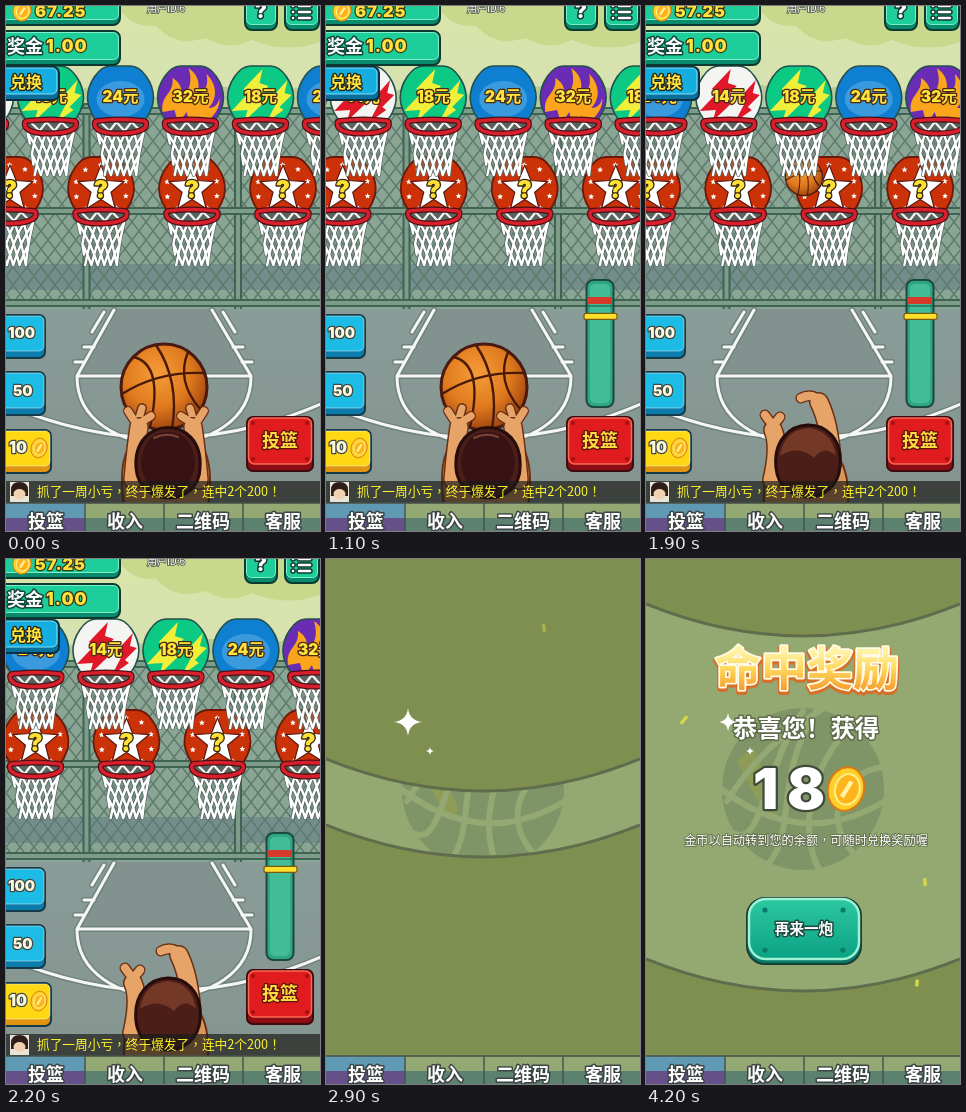
Recreate the animation shown at these times as an HTML page. Size 314 px wide and 525 px high, loop 4300 ms.

```html
<!DOCTYPE html>
<html lang="zh-CN">
<head>
<meta charset="utf-8">
<title>投篮</title>
<style>
html, body { margin: 0; width: 100%; height: 100%; overflow: hidden; background: #7f8f50; }
svg { display: block; width: 314px; height: 525px; }
text { font-family: "Noto Sans CJK SC", "Noto Sans CJK", "Noto Sans", sans-serif; }
.num { font-family: Inter, "Noto Sans CJK SC", "Noto Sans CJK", sans-serif; }
.plain { font-family: "Noto Sans CJK TC", "Noto Sans CJK", sans-serif; }
.b { font-weight: 900; paint-order: stroke; stroke-linejoin: round; }
.m { text-anchor: middle; }
.s { letter-spacing: 1px; }
</style>
</head>
<body>
<svg id="stage" viewBox="0 0 314 525"></svg>
<script>
const LOOP = 4300, STEP = 100;
const stage = document.getElementById('stage');
const clamp = v => Math.max(0, Math.min(1, v));
const mix = (a, b, k) => a + (b - a) * k;
const ramp = (t, a, b) => clamp((t - a) / (b - a));

// value at t from [time, value] pairs
function keys(t, list) {
  let [pt, pv] = list[0];
  for (const [kt, kv] of list) {
    if (t <= kt) return kt === pt ? kv : mix(pv, kv, ramp(t, pt, kt));
    [pt, pv] = [kt, kv];
  }
  return pv;
}

const box = (x, y, w, h, r, fill, edge = '#12382f', sw = 2) =>
  `<rect x="${x}" y="${y}" width="${w}" height="${h}" rx="${r}" fill="${fill}" stroke="${edge}" stroke-width="${sw}"/>`;
const label = (s, x, y, size, fill, edge, sw, cls = '') =>
  `<text class="b ${cls}" x="${x}" y="${y}" font-size="${size}" fill="${fill}" stroke="${edge}" stroke-width="${sw}">${s}</text>`;
const line = (d, color, w) =>
  `<path d="${d}" fill="none" stroke="${color}" stroke-width="${w}" stroke-linecap="round" stroke-linejoin="round"/>`;
const outlined = (d, color, w, edge) => line(d, edge, w + 3) + line(d, color, w);
const dots = (list, r, fill) => list.map(([x, y]) => `<circle cx="${x}" cy="${y}" r="${r}" fill="${fill}"/>`).join('');
const corners = (x, y) => [[-x, -y], [x, -y], [-x, y], [x, y]];

const coin = (x, y, rx, ry) => `<g transform="translate(${x} ${y}) rotate(14)">
  <ellipse rx="${rx}" ry="${ry}" fill="#ffd02c" stroke="#d97a12" stroke-width="${rx / 9}"/>
  <ellipse cx="${rx * .08}" rx="${rx * .68}" ry="${ry * .7}" fill="#ffb41c" stroke="#fff08a" stroke-width="${rx / 9}"/>
  <path d="M${rx * .2} ${-ry * .4}L${-rx * .12} ${ry * .4}" stroke="#fff3a0" stroke-width="${rx / 4}"/></g>`;

function netPath() {
  const at = (i, j) => {
    const w = 23 - 2.6 * j + .2 * j * j;
    return `${(-w + 2 * w * Math.max(0, Math.min(5, i)) / 5).toFixed(1)} ${(6 + j * 10.5).toFixed(1)}`;
  };
  let d = '';
  for (let j = 0; j < 4; j++)
    for (let i = 0; i <= 5; i++) {
      const c = i + (j % 2) / 2;
      d += `M${at(c, j)}L${at(c - .5, j + 1)}M${at(c, j)}L${at(c + .5, j + 1)}`;
    }
  return d;
}

function starPath(n, R, r, x = 0, y = 0) {
  let d = '';
  for (let i = 0; i < n * 2; i++) {
    const a = Math.PI * (i / n - .5), q = i % 2 ? r : R;
    d += `${i ? 'L' : 'M'}${(x + q * Math.cos(a)).toFixed(2)} ${(y + q * Math.sin(a)).toFixed(2)}`;
  }
  return d + 'Z';
}

const drop = 'M-33 0C-33 -14 -22 -32 -10 -32H10C22 -32 33 -14 33 0C33 14 22 24 18 32H-18C-22 24 -33 14 -33 0Z';
const bolt = 'M-29 13L-12 -5L-17 -9L2 -29L-1 -15L8 -12L-6 2L3 5L-16 23L-13 12ZM6 24L15 7L9 2L27 -18L24 -5L31 -3L19 9L23 12Z';
const flame = 'M-28 14C-30 -4 -16 -4 -18 -20C-8 -14 -8 -6 -10 0C0 -6 2 -18 -2 -30C12 -20 8 -8 6 -2C16 -6 18 -14 16 -24C28 -12 26 2 18 10C26 10 28 4 29 0C30 14 18 22 12 28L8 18L0 27L-4 14L-12 26L-16 12Z';
const art = {
  14: ['#f4f4f2', `<path d="${bolt}" fill="#e01828"/>`],
  18: ['#0cc983', `<path d="${bolt}" fill="#f0f03a"/>`],
  24: ['#0f7fd2', '<ellipse cy="1" rx="24" ry="18" fill="#3a9ade"/>'],
  32: ['#6a2cb4', `<path d="${flame}" fill="#fba51c"/>`]
};
const prizes = [24, 14, 18, 24, 32, 18, 24];

const prizeBoard = n => `<path d="${drop}" fill="${art[n][0]}" stroke="#23504c" stroke-width="1.6"/>${art[n][1]}` +
  label(n + '元', 0, 4, 15.5, '#ffe43c', '#4a2a10', 2.6, 'num m');
function mysteryBoard() {
  let stars = '';
  for (let i = 0; i < 10; i++) {
    const a = i * Math.PI / 5 + .3;
    stars += starPath(5, 3, 1.4, 26 * Math.cos(a), 24 * Math.sin(a));
  }
  return `<path d="${drop}" fill="#cc3208" stroke="#6a1a0c" stroke-width="1.8"/><path d="${stars}" fill="#fff"/>
    <path d="${starPath(5, 24, 10.5)}" fill="#fff" stroke="#5c1a10" stroke-width="1.2"/>` +
    label('?', 0, 9, 24, '#ffe034', '#33240c', 2.6, 'num m');
}
const row = (n, y, make, cls) => Array.from({ length: n }, (_, i) =>
  `<g class="${cls}" data-y="${y}">${make(i)}</g>`).join('');
const hoop = () => '<use href="#hoop"/>';

const rimPath = 'M-24 -6Q0 -9 24 -6Q27 -5 25 0Q20 6 0 6.500T-25 0Q-27 -5 -24 -6Z';
const defs = `<defs>
  <pattern id="mesh" width="14" height="18" patternUnits="userSpaceOnUse">
    <path d="M0 0L7 9L0 18M14 0L7 9L14 18" fill="none" stroke="#5d7a6c" stroke-width="1.5"/></pattern>
  <radialGradient id="leather" cx=".42" cy=".35" r=".7">
    <stop offset="0" stop-color="#f59c3a"/><stop offset=".55" stop-color="#e07a1e"/><stop offset="1" stop-color="#963c0c"/></radialGradient>
  <linearGradient id="sky" x2="0" y2="1"><stop offset="0" stop-color="#d9e5a8"/><stop offset="1" stop-color="#d5e0b6"/></linearGradient>
  <linearGradient id="floor" x2="0" y2="1"><stop offset="0" stop-color="#8a9c98"/><stop offset="1" stop-color="#84948f"/></linearGradient>
  <linearGradient id="gold" x2="0" y2="1">
    <stop offset=".3" stop-color="#fff3a6"/><stop offset=".55" stop-color="#ffd95c"/><stop offset=".9" stop-color="#f59a2c"/></linearGradient>
  <linearGradient id="mint" x2="0" y2="1"><stop offset="0" stop-color="#2cc9a0"/><stop offset="1" stop-color="#0ba184"/></linearGradient>
  <g id="hoop"><path d="M-23 5H23L17 47H-17Z" fill="#6c8078" opacity=".45"/>
    ${line(netPath(), '#4a5a54', 3.6)}${line(netPath(), '#fff', 2.4)}
    <path d="${rimPath}" fill="#57635e"/>${line('M-19 -4L-11 4L-4 -5L4 4L11 -5L19 3', '#f4f4f0', 2.2)}
    ${line(rimPath, '#4c1014', 6)}${line(rimPath, '#d81f2c', 3.6)}</g>
  <g id="ball"><circle r="43" fill="url(#leather)" stroke="#4a1a10" stroke-width="3"/>
    ${line('M-42 7Q-6 -16 40 -14M-8 -42Q16 -6 8 42M-30 -30Q0 -22 -14 40M24 -35Q12 -6 36 22', '#4a1a08', 2.4)}</g>
  <clipPath id="slot"><path id="slotPath"/></clipPath>
</defs>`;

const pole = (x, y, w, h) => box(x, y, w, h, 1, '#7d9c8a', '#3f6552', 2);
const scenery = `
  <rect width="314" height="130" fill="url(#sky)"/>
  <path d="M112 0Q124 22 150 20Q170 42 200 32Q222 46 246 34Q280 48 314 36V0Z" fill="#c8d98e"/>
  <path d="M0 108V92Q26 72 56 90Q110 66 150 92Q200 70 250 88Q286 74 314 90V108Z" fill="#b4cc9c"/>
  <rect y="106" width="314" height="197" fill="#8aa594"/>
  <rect y="258" width="314" height="26" fill="#728d8c"/>
  <rect y="106" width="314" height="190" fill="url(#mesh)"/>
  ${pole(77.5, 98, 6, 206)}${pole(229, 98, 6, 206)}
  ${pole(-4, 102, 322, 6)}${pole(-4, 202, 322, 6)}${pole(-4, 294, 322, 6)}
  <rect y="303" width="314" height="222" fill="url(#floor)"/>
  <path d="M108 303H206L244 370H72Z" fill="#82928f"/>
  ${outlined('M108 304L71 370H245L206 304M71 370C70 460 246 460 245 370M98 306L86 326M78 341H88M69 356H79M217 306L229 326M227 341H237M236 356H246M-10 394Q157 470 324 394', '#f4f7f4', 3, '#71827e')}`;

const SKIN = '#e6a468', INK = '#6a3014';
const holding = `<g id="hold">
  <path d="M118 500Q112 456 124 440H196Q208 458 202 500Z" fill="#d9955a" stroke="${INK}" stroke-width="2"/>
  ${['', 'translate(320 0) scale(-1 1)'].map(f => `<g transform="${f}">
    ${outlined('M122 405L131 419L145 410M131 419L136 402', SKIN, 7, INK)}
    ${outlined('M133 421Q130 440 127 474', SKIN, 17, INK)}${line('M122 405L131 419L145 410', SKIN, 7)}</g>`).join('')}
  <path d="M130 462C126 408 198 408 194 462C193 502 133 502 130 462Z" fill="#4c1e18" stroke="#260c0c" stroke-width="3"/>
  <path d="M135 458Q137 426 162 426T189 458Q186 484 162 484T135 458Z" fill="#381316"/>
  ${line('M148 432Q160 426 172 431', '#7a4436', 2)}</g>`;
const arms = 'M127 424Q134 440 126 474M173 396Q184 418 186 458';
const released = `<g id="throw">
  <path d="M118 500Q116 466 132 450H192Q204 468 202 500Z" fill="#d9955a" stroke="${INK}" stroke-width="2"/>
  ${outlined('M119 409L127 420L134 411M155 392Q164 387 174 394', SKIN, 8, INK)}
  ${outlined(arms, SKIN, 17, INK)}${line('M119 409L127 420L134 411M155 392Q164 387 174 394', SKIN, 8)}
  <path d="M130 462C124 406 199 404 194 460C192 500 134 502 130 462Z" fill="#4c1e18" stroke="#260c0c" stroke-width="3"/>
  <path d="M134 450Q138 424 162 422Q186 424 190 450Q178 438 168 452Q152 438 134 450Z" fill="#743826"/></g>`;

const chip = (y, w, fill, low) => box(-8, y, w + 8, 43, 6, low, '#153a48') + box(-7, y + 1, w + 6, 35, 5, fill, '#ffffff70', 1);
const panel = (x, y, w, h) => box(x, y, w, h, 7, '#0a8a6c', '#0c3a30') + box(x + 1.5, y + 1.5, w - 3, h - 7, 5, '#1dcd9a', '#7df0c8', 1);
const hud = `
  ${panel(-8, -14, 122, 33)}${coin(16, 5, 9, 10)}<g id="cash"></g>
  ${panel(-8, 25, 122, 34)}
  ${label('奖金', 1, 47, 18, '#fff', '#12463a', 3)}
  ${label('1.00', 40, 46, 17, '#ffe23e', '#3a3410', 2.4, 'num s')}
  ${box(-8, 61, 61, 33, 6, '#0b6f9c', '#0c303f')}${box(-7, 62, 58, 26, 5, '#14aee0', '#80e2fa', 1)}
  ${label('兑换', 4, 82, 16, '#ffe63c', '#2a2410', 2.6)}
  <text class="m" x="160" y="6" font-size="10" fill="#fff" stroke="#4a554a" stroke-width="1.6" paint-order="stroke">用户ID:6</text>
  ${panel(239, -10, 32, 34)}${label('?', 255, 12, 20, '#fff', '#12382f', 3, 'num m')}
  ${panel(279, -10, 34, 34)}
  ${outlined('M293 0H304M293 6H304M293 12H304M287 0h.1M287 6h.1M287 12h.1', '#fff', 2.5, '#12382f')}
  ${chip(309, 39, '#1cbce6', '#0b7cab')}${chip(366, 39, '#1cbce6', '#0b7cab')}${chip(424, 45, '#ffd814', '#e09410')}
  ${[['100', 2, 332, 14.5], ['50', 7, 390, 14.5], ['10', 3, 447, 15.5]].map(([s, x, y, n]) =>
    label(s, x, y, n, '#fff8dc', '#3d4a44', 2.4, 'num')).join('')}
  ${coin(33, 442, 8, 10)}
  ${box(241, 411, 66, 54, 6, '#8c0d14', '#3c0a0c')}${box(242.5, 412, 63, 46, 6, '#e01c1e', '#f86a58', 1.5)}
  <g transform="translate(274 435)">${dots(corners(27, 18), 2, '#a01014')}</g>
  ${label('投篮', 274, 441, 18, '#ffdb40', '#5c1410', 2.6, 'm')}`;

const gauge = `<g id="gauge">${box(260.5, 274, 27, 127, 7, '#2fa583', '#1a4a3c')}
  ${box(264, 278, 20, 119, 5, '#43bd97', 'none', 0)}
  <rect x="262" y="291" width="24" height="7" fill="#d63a2a"/>
  <path d="M261.5 300H286.5" stroke="#1a4a3c" stroke-width="1"/>
  <g id="mark">${box(258, -3, 33, 6, 2, '#ffe02a', '#7a5a10', 1.2)}</g></g>`;

const notice = `<rect y="475" width="314" height="22" fill="#1a1a18" opacity=".68"/>
  <rect x="4" y="476" width="19" height="20" fill="#e9e4d8"/>
  <path d="M5 490V484Q5 476 13.500 476T22 484V490Z" fill="#2e1e1a"/>
  <ellipse cx="13.500" cy="488" rx="6" ry="5" fill="#f2d0b0"/>
  <text class="plain" lang="zh-TW" x="31" y="490" font-size="12.7" fill="#fff42a">抓了一周小亏，终于爆发了，连中2个200！</text>`;

const tabs = ['投篮', '收入', '二维码', '客服'].map((s, i) =>
  label(s, [40, 119, 197, 277][i], 522, 18, '#fff', '#3c4444', 3, 'm')).join('');
const nav = `<rect y="497" width="314" height="16" fill="#93a873"/><rect y="512" width="314" height="13" fill="#5c8170"/>
  <rect y="497" width="79" height="16" fill="#6099b2"/><rect y="512" width="79" height="13" fill="#66508a"/>
  <path d="M0 497H314M79 497V525M158 497V525M237 497V525" stroke="#45524a" stroke-width="1.4"/>${tabs}`;

const emblem = `<g transform="translate(157 230)"><circle r="81" fill="#7f9567"/>
  <path d="M-66 -28L-50 -42L-24 22L-36 30Z" fill="#8e9c57"/>
  ${line('M-76 12Q-40 -46 20 -80M-70 44C-40 60 -40 -20 0 -78M-34 74C-6 40 -30 -10 14 -80M16 80C-6 40 10 -30 50 -64M50 64C20 30 36 -14 78 -22M-82 0Q0 62 82 12', '#94a873', 6)}</g>`;

const win = `<g id="win">
  <rect width="314" height="497" fill="#7f8f50"/>
  <g clip-path="url(#slot)"><rect width="314" height="497" fill="#94a871"/>${emblem}</g>
  <path id="rim" fill="none" stroke="#5f6d4c" stroke-width="3"/>
  <g id="bits"></g>
  <g id="title">${label('命中奖励', 0, 19, 46, '#d5702a', '#d5702a', 6, 'm')}
    ${label('命中奖励', 0, 17, 46, 'url(#gold)', '#fffbe6', 3.5, 'm')}</g>
  <g id="cheer">${label('恭喜您！获得', 0, 9, 24.4, '#fff', '#5d6b4a', 3, 'm')}</g>
  <g id="sum">${label('1', -53, 20, 56, '#fff', '#3f4a3a', 4.5, 'num')}${label('8', -19, 20, 56, '#fff', '#3f4a3a', 4.5, 'num')}
    ${coin(40, 0, 18, 22)}</g>
  <text id="note" class="plain m" lang="zh-TW" x="160" y="286" font-size="12.2" fill="#fff" stroke="#5d6b4a" stroke-width="1.6" paint-order="stroke">金币以自动转到您的余额，可随时兑换奖励喔</text>
  <g id="again">${box(-57, -32, 114, 66, 18, '#087a66', '#173f36')}${box(-55, -31, 110, 60, 17, 'url(#mint)', '#9df3d2', 2.5)}
    ${dots(corners(39, 20), 2.6, '#0a7c68')}
    ${label('再来一炮', 0, 4, 14.6, '#fff', '#1d4a40', 3, 'm')}</g>
  <g id="glints" fill="#fff"></g></g>`;

stage.innerHTML = defs + `<g id="game">${scenery}
  ${row(prizes.length, 92, i => prizeBoard(prizes[i]), 'top')}
  ${row(6, 183, mysteryBoard, 'low')}
  <g id="ballBack"><use href="#ball"/></g>
  ${row(6, 211, hoop, 'low')}${row(prizes.length, 121, hoop, 'top')}
  ${hud}${gauge}<g id="ballFront"><use href="#ball"/></g>${holding}${released}${notice}</g>` + win + nav;

const $ = id => document.getElementById(id);
const tops = [...document.querySelectorAll('.top')], lows = [...document.querySelectorAll('.low')];
const show = (id, on) => $(id).setAttribute('display', on ? 'inline' : 'none');
const place = (id, x, y, s = 1) => $(id).setAttribute('transform', `translate(${x} ${y}) scale(${s})`);

const THROW = 1130, APEX = 1650;
function ballAt(t) {
  if (t < THROW) return [381, 44];
  const y = t < APEX ? 24 + 286 * ((APEX - t) / 450) ** 1.53 : 24 + 2355 * ((t - APEX) / 1000) ** 2;
  return [y, t < APEX ? 20 + 24 * clamp((y - 77) / 304) : 19];
}

function gaugeAt(t) {
  const d = Math.min(t, 980) - 300, up = 395 - .205 * d;
  return up < 283 ? 566 - up : up;
}

function drawGame(t) {
  tops.forEach((g, i) => g.setAttribute('transform',
    `translate(${114.5 + .057 * t + (i % prizes.length - 3) * 70} ${g.dataset.y})`));
  const shift = (4 + .0943 * t) % 91;
  lows.forEach((g, i) => g.setAttribute('transform', `translate(${shift + (i % 6 - 1) * 91} ${g.dataset.y})`));

  const [y, r] = ballAt(t);
  show('ballFront', t < 1600);
  show('ballBack', t >= 1600 && t < 2100);
  place('ballFront', 158, y, r / 44);
  place('ballBack', 158, y, r / 44);
  show('hold', t < THROW);
  show('throw', t >= THROW);
  show('gauge', t >= 300);
  place('mark', 0, gaugeAt(Math.max(300, t)));
  $('cash').innerHTML = label(t < THROW ? '67.25' : '57.25', 29, 11, 16.5, '#ffe23e', '#3a3410', 2.4, 'num s');
}

// x, y, time at that point, speed, first and last time, angle, length
const bits = [
  [218, 69, 2900, .025, 2800, 3700, -8, 8], [38, 98, 3300, .07, 3000, 4300, 40, 10],
  [86, 96, 3300, .04, 3200, 3700, 10, 4], [279, 323, 4200, .12, 3700, 4300, -5, 8],
  [271, 424, 4200, .15, 3700, 4300, 5, 7]
];

function glint(x, y, r) {
  if (r < .5) return '';
  const q = r * .1;
  return `<path transform="translate(${x} ${y})" d="M0 ${-r}Q${q} ${-q} ${r} 0Q${q} ${q} 0 ${r}Q${-q} ${q} ${-r} 0Q${-q} ${-q} 0 ${-r}Z"/>`;
}

function drawWin(t) {
  show('win', t >= 2600);
  $('win').setAttribute('opacity', ramp(t, 2500, 2800));
  const half = keys(t, [[2800, 0], [2900, 33], [3100, 206], [3300, 177.5]]);
  const cy = keys(t, [[2900, 265], [3100, 254.5]]);
  const a = cy - half, b = cy + half;
  const arc = y => `0 ${y - 32}Q157 ${y + 32} 314 ${y - 32}`;
  $('slotPath').setAttribute('d', `M${arc(a)}L314 ${b - 32}Q157 ${b + 32} 0 ${b - 32}Z`);
  $('rim').setAttribute('d', half ? `M${arc(a)}M${arc(b)}` : '');

  show('cheer', t >= 3200);
  place('cheer', 160, 169, keys(t, [[3200, 1.6], [3300, 1.27], [3500, 1]]));
  show('sum', t >= 3200);
  place('sum', 160, 230, keys(t, [[3200, 1.3], [3300, 1.02], [3500, 1]]));
  show('title', t >= 3400);
  place('title', 161, 109, keys(t, [[3400, 1.8], [3600, .95], [3700, 1]]));
  show('note', t >= 3600);
  show('again', t >= 3600);
  place('again', 158, 371, keys(t, [[3600, .7], [3700, 1.06], [3800, 1]]));

  $('bits').innerHTML = bits.filter(p => t >= p[4] && t < p[5]).map(([x, y, at, v, , , turn, n]) =>
    `<rect x="-1.700" y="${-n / 2}" width="3.4" height="${n}" rx="1" fill="#d5d64c" opacity="${t < 3000 ? .5 : 1}"
      transform="translate(${x} ${y + v * (t - at)}) rotate(${turn})"/>`).join('');
  const wave = t < 2800 ? 0 : Math.cos((t - 2900) / 1140 * 2 * Math.PI);
  $('glints').innerHTML = glint(82, 163, 14 * wave) + glint(104, 192, wave > 0 ? 4 : 0) +
    glint(241, 151, -15 * wave) + glint(230, 146, wave < 0 ? 3 : 0);
}

function draw(t) {
  drawGame(t);
  drawWin(t);
}

const start = performance.now();
function tick() {
  const t = (performance.now() - start) % LOOP;
  draw(Math.floor(t / STEP) * STEP);
  requestAnimationFrame(tick);
}
tick();
</script>
</body>
</html>
```
